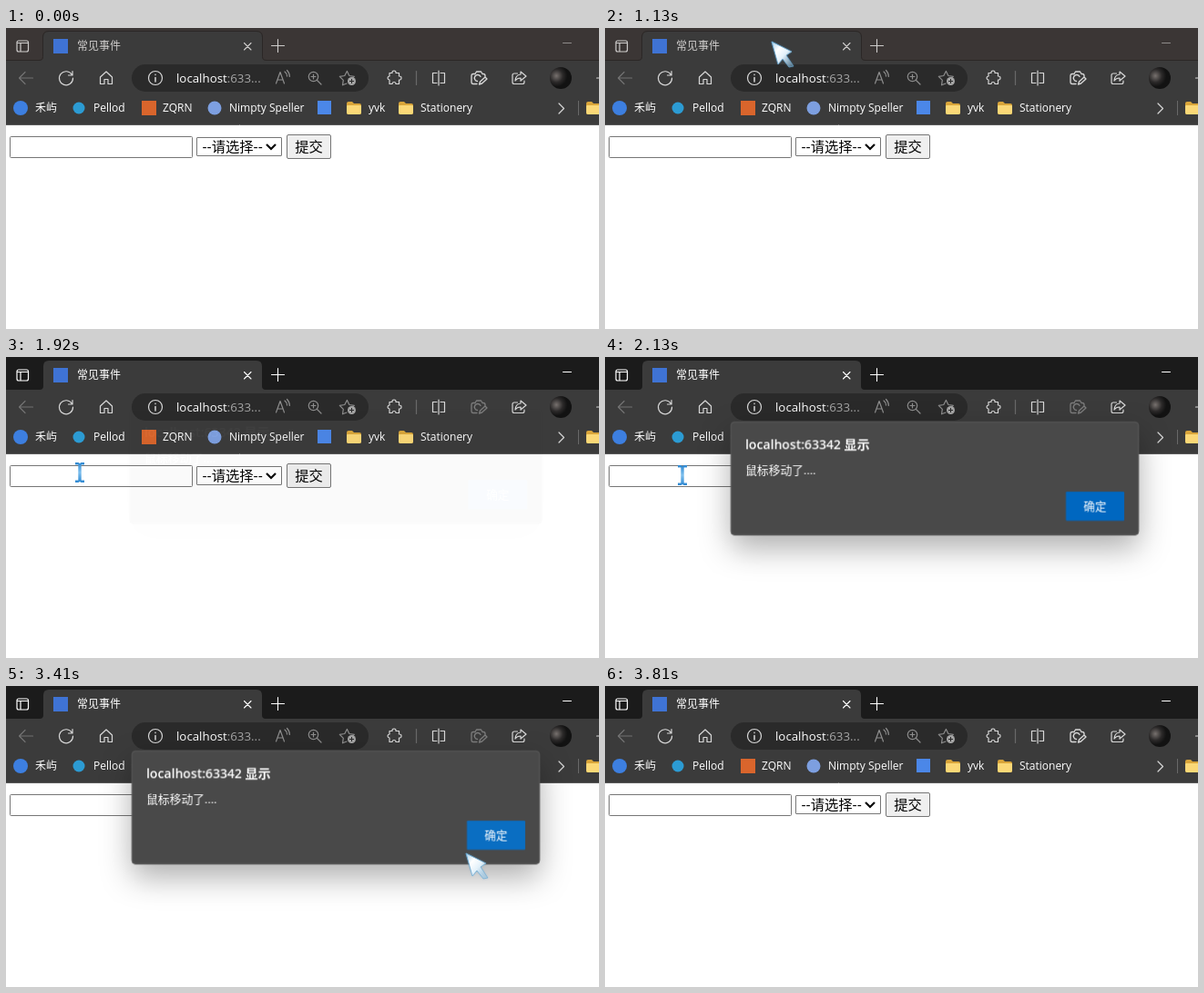
These frames come from a looping animation (651 px wide and 331 px high, 4.24 s). An HTML page:

```html
<!DOCTYPE html>
<html lang="zh">
<head>
<meta charset="utf-8">
<title>常见事件</title>
<style>
html, body { margin: 0; width: 100%; height: 100%; overflow: hidden; background: #fff; }
svg { display: block; }
text { font: 12px 'Open Sans', 'Noto Sans CJK SC', 'Noto Sans CJK', sans-serif; fill: #fff; }
.line { fill: none; stroke: #d8d8d8; stroke-width: 1.2; stroke-linecap: round; stroke-linejoin: round; }
.dim { stroke: #8d8d8d; }
.title { stroke: currentColor; }
.form { font: 15.3px 'Liberation Sans', 'Noto Sans CJK SC', 'Noto Sans CJK', sans-serif; fill: #000; }
.box { fill: #fff; stroke: #767676; }

/* one loop, hard changes unless a keyframe says otherwise */
.bar, .rim, .title, .min, .camera, .dialog, .ok, .cursor, .arrow, .beam { animation: 4240ms step-end infinite; }
.bar { animation-name: bar; }
.rim { animation-name: rim; }
.title { animation-name: title; }
.min { animation-name: min; }
.camera { animation-name: camera; }
.dialog { animation-name: dialog; transform-origin: 362px 133px; }
.ok { animation-name: ok; }
.cursor { animation-name: move; }
.arrow { animation-name: arrow; }
.beam { animation-name: beam; }

@keyframes bar { 0% { fill: #3b3635; } 43.62%, 100% { fill: #1b1b1b; } }
@keyframes rim { 0% { opacity: 1; } 43.62%, 100% { opacity: 0; } }
@keyframes title { 0% { color: #cfcdcc; } 43.62%, 100% { color: #fff; } }
@keyframes min { 0% { stroke: #8f8c8b; } 43.62%, 100% { stroke: #fff; } }
@keyframes camera { 0% { stroke: #d8d8d8; } 43.62% { stroke: #7c7c7c; } 84.9%, 100% { stroke: #d8d8d8; } }
@keyframes ok { 0% { fill: #0067c0; } 80.4%, 100% { fill: #0a6ec2; } }
@keyframes dialog {
  0% { opacity: 0; transform: translateY(-14px) scale(1.01); }
  45.27% { opacity: .025; transform: translateY(-13px) scale(1.01); }
  46.92% { opacity: .5; transform: translateY(-6px) scale(1.005); }
  48.57% { opacity: .92; transform: translateY(-2px); }
  50.22% { opacity: 1; transform: none; }
  84.9% { opacity: 1; transform: translateY(-1px); }
  86.54% { opacity: .97; transform: translateY(-5px) scale(1.004); }
  88.43% { opacity: .4; transform: translateY(-10px) scale(1.008); }
  89.84%, 100% { opacity: 0; transform: translateY(-14px) scale(1.01); }
}
@keyframes move {
  0% { transform: translate(80px, -50px); }
  15.56% { transform: translate(80px, -14px); animation-timing-function: steps(3, end); }
  20.3% { transform: translate(140px, 21px); animation-timing-function: steps(4, end); }
  26.64% { transform: translate(183px, 15px); }
  31.12% { transform: translate(170px, 26px); animation-timing-function: steps(5, end); }
  39.03% { transform: translate(62px, 106px); }
  40.6% { transform: translate(66px, 129px); }
  42.2% { transform: translate(79px, 127px); }
  43.62% { transform: translate(81px, 127px); }
  46.92% { transform: translate(83px, 128px); }
  50.22% { transform: translate(85px, 130px); }
  70.98% { transform: translate(88px, 131px); }
  72.39% { transform: translate(112px, 134px); animation-timing-function: steps(5, end); }
  80.4% { transform: translate(505px, 184px); }
  82.06% { transform: translate(532px, 172px); }
  83.48% { transform: translate(531px, 180px); }
  84.9% { transform: translate(528px, 198px); }
  86.54% { transform: translate(523px, 226px); }
  88.43% { transform: translate(512px, 288px); }
  89.84%, 100% { transform: translate(505px, 350px); }
}
@keyframes arrow { 0% { opacity: 1; } 40.6% { opacity: 0; } 73.99%, 100% { opacity: 1; } }
@keyframes beam { 0% { opacity: 0; } 40.6% { opacity: 1; } 73.99%, 100% { opacity: 0; } }
</style>
</head>
<body>
<svg width="651" height="331" viewBox="0 0 651 331">
  <defs>
    <linearGradient id="ice" x1="0" y1="0" x2="1" y2="1">
      <stop offset="0" stop-color="#a9cfe8"/><stop offset=".3" stop-color="#fff"/>
      <stop offset=".55" stop-color="#e3f1fa"/><stop offset="1" stop-color="#7db8de" stop-opacity=".35"/>
    </linearGradient>
    <linearGradient id="edge" x1="0" y1="0" x2="1" y2="1">
      <stop offset="0" stop-color="#6aaad4"/><stop offset="1" stop-color="#6aaad4" stop-opacity=".6"/>
    </linearGradient>
    <linearGradient id="stem" x1="0" y1="0" x2="0" y2="1">
      <stop offset="0" stop-color="#2b86d0"/><stop offset=".5" stop-color="#7fc0ee"/><stop offset="1" stop-color="#2b86d0"/>
    </linearGradient>
    <radialGradient id="photo" cx=".3" cy=".4">
      <stop offset="0" stop-color="#77716e"/><stop offset=".6" stop-color="#2b2929"/><stop offset="1" stop-color="#121212"/>
    </radialGradient>
    <filter id="glow" x="-50%" y="-50%" width="200%" height="200%">
      <feDropShadow dx="0" dy="0" stdDeviation="1" flood-color="#4f9bd0" flood-opacity=".35"/>
    </filter>
    <filter id="shade" x="-20%" y="-40%" width="140%" height="210%">
      <feDropShadow dx="0" dy="14" stdDeviation="17" flood-color="#000" flood-opacity=".32"/>
    </filter>
    <g id="folder">
      <path d="M0 2q0-2 2-2h4l2 2h6q2 0 2 2v8q0 2-2 2H2q-2 0-2-2z" fill="#d9a53a"/>
      <path d="M0 5q0-1 1-1h14q1 0 1 1v7q0 2-2 2H2q-2 0-2-2z" fill="#fbd877"/>
    </g>
  </defs>

  <!-- title bar -->
  <rect class="bar" width="651" height="37"/>
  <path d="M0 36H37q4 0 4-4V10q0-6 6-6H275q6 0 6 6V32q0 4 4 4H651V106H0z" fill="#3b3b3b"/>
  <path class="rim" d="M0 35.500H36q4.500 0 4.500-4V10q0-6.500 6.500-6.500H275q6.500 0 6.500 6.500V31.500q0 4 4.500 4H651" fill="none" stroke="#2b2726"/>
  <path d="M0 106.500H651" stroke="#5a5a5a"/>
  <g class="line title">
    <rect x="12" y="14" width="12.500" height="12" rx="2"/>
    <path d="M12.500 16.500H24M16 17V25.500"/>
    <path d="M261.500 16.500l7.500 7.500m0-7.500l-7.500 7.500M291.500 19.500h14m-7-7v14" stroke-width="1.1"/>
    <path class="min" d="M611.500 16.500h9" stroke-width="1"/>
  </g>
  <rect x="52" y="12" width="16" height="16" fill="#3f73d4"/>
  <text class="title" x="78" y="24" style="fill:currentColor;stroke:none">常见事件</text>

  <!-- toolbar -->
  <rect x="138" y="40" width="260" height="30" rx="15" fill="#2a2a2a"/>
  <g class="line">
    <path class="dim" d="M29.500 55H14.500l6.500-6.500M14.500 55l6.500 6.500" style="stroke:#737373"/>
    <path d="M72.500 51.500A7.500 7.500 0 1 0 73.500 55M73 47.500v4.500h-4.500"/>
    <path d="M103.500 54l6.500-6 6.500 6v7.500h-4.500v-5h-4v5h-4.500z"/>
    <circle cx="164" cy="55" r="7.500"/><path d="M164 54.500v4.500M164 51.200v.2" stroke-width="1.500"/>
    <g class="dim">
      <path d="M296.500 61l4.500-12.500 4.500 12.500M298 57h6M306 48q2.500 2 2.500 5M308.500 46.500q3 3 2.800 7"/>
      <circle cx="337.500" cy="53.500" r="5.200"/><path d="M341.500 57.500l4.500 4.500M335 53.500h5M337.500 51v5"/>
      <path d="M374 61l-4.500 1.800.8-5.500-4-4 5.500-.8 2.600-5 2.500 5 5.400.8-2 2"/>
    </g>
    <path d="M421 49.500h3q-.3-2.500 2-2.500t2 2.500h3.500v3.500q2.500-.2 2.500 2t-2.500 2v4.500h-3.500q0-2-2-2t-2 2h-3v-4.500q-2-.2-2-2t2-2z"/>
    <path d="M450.500 47.500v15" stroke="#696969"/>
    <path d="M473 49.500h-4.500v11h4.500M477 49.500h4.500v11H477M475 47v16"/>
    <g class="camera">
      <path d="M517 61.500h-4q-2 0-2-2v-7q0-2 2-2h2l1.500-2.500h5l1.500 2.500h1q2 0 2 2v1.500M521 53.500a3.500 3.500 0 1 0-3.500 5M519.500 62l1-3 5.500-5 2 2-5.500 5z" stroke-width="1.350"/>
    </g>
    <path d="M561.500 50H558q-2 0-2 2v7.500q0 2 2 2h9q2 0 2-2V58M565 48l6 5-6 5v-3q-4 0-6 3 .5-6.500 6-7z"/>
    <path d="M648.500 55h3"/>
  </g>
  <circle cx="379.500" cy="58.500" r="4.500" fill="#a5a5a5"/>
  <path d="M377 58.500h5m-2.500-2.500v5" stroke="#2a2a2a"/>
  <text x="187" y="59.500" style="font-size:13.3px">localhost<tspan fill="#a6a6a6">:633...</tspan></text>
  <circle cx="609" cy="55" r="12" fill="url(#photo)"/>

  <!-- bookmarks -->
  <circle cx="16" cy="88" r="8" fill="#3d7fe0"/>
  <text x="32" y="92">禾屿</text>
  <circle cx="80" cy="88" r="6.500" fill="#2c9bd3"/>
  <text x="96" y="92">Pellod</text>
  <rect x="149" y="80" width="16" height="16" fill="#d9652c"/>
  <text x="172" y="92">ZQRN</text>
  <circle cx="229" cy="88" r="7.500" fill="#7d9fe0"/>
  <text x="245" y="92">Nimpty Speller</text>
  <rect x="342" y="80" width="15" height="15" fill="#4b87e8"/>
  <use href="#folder" x="374" y="81"/>
  <text x="398" y="92">yvk</text>
  <use href="#folder" x="431" y="81"/>
  <text x="455" y="92">Stationery</text>
  <path class="line" d="M607 83l5.500 5.500-5.500 5.500"/>
  <path d="M628.500 80v16" stroke="#696969"/>
  <use href="#folder" x="637" y="81"/>

  <!-- form -->
  <rect class="box" x="4.500" y="119.500" width="200" height="23" rx="1"/>
  <rect class="box" x="209.500" y="120.500" width="93" height="20" rx=".5"/>
  <text class="form" x="215.500" y="136">--请选择--</text>
  <path d="M286 128l5 5 5-5" fill="none" stroke="#000" stroke-width="2.200"/>
  <rect class="box" x="308.500" y="117.500" width="48" height="26" rx="1.500" style="fill:#efefef"/>
  <text class="form" x="317.300" y="136">提交</text>

  <!-- alert -->
  <g class="dialog">
    <rect x="138" y="71" width="448" height="125" rx="4" fill="#4a4a4a" filter="url(#shade)"/>
    <rect x="138.500" y="71.500" width="447" height="124" rx="4" fill="none" stroke="#585858"/>
    <text x="154" y="101" style="font-size:14px;font-weight:600">localhost:63342 显示</text>
    <text x="154" y="129" style="font-size:12.8px">鼠标移动了....</text>
    <rect class="ok" x="506" y="148" width="64" height="32" rx="1"/>
    <text x="538" y="168.500" text-anchor="middle" style="font-size:12.5px">确定</text>
  </g>

  <!-- pointer -->
  <g class="cursor">
    <path class="arrow" d="M0 0L22 11 16 15 24 27 19 28 12 19 7 25z" fill="url(#ice)" stroke="url(#edge)" stroke-linejoin="round" filter="url(#glow)"/>
    <path class="beam" d="M-5-11H-1.500L0-10 1.500-11H5V-8.500H1.700V8.500H5V11H1.500L0 10-1.500 11H-5V8.500H-1.700V-8.500H-5z" fill="url(#stem)"/>
  </g>
</svg>
</body>
</html>
```
